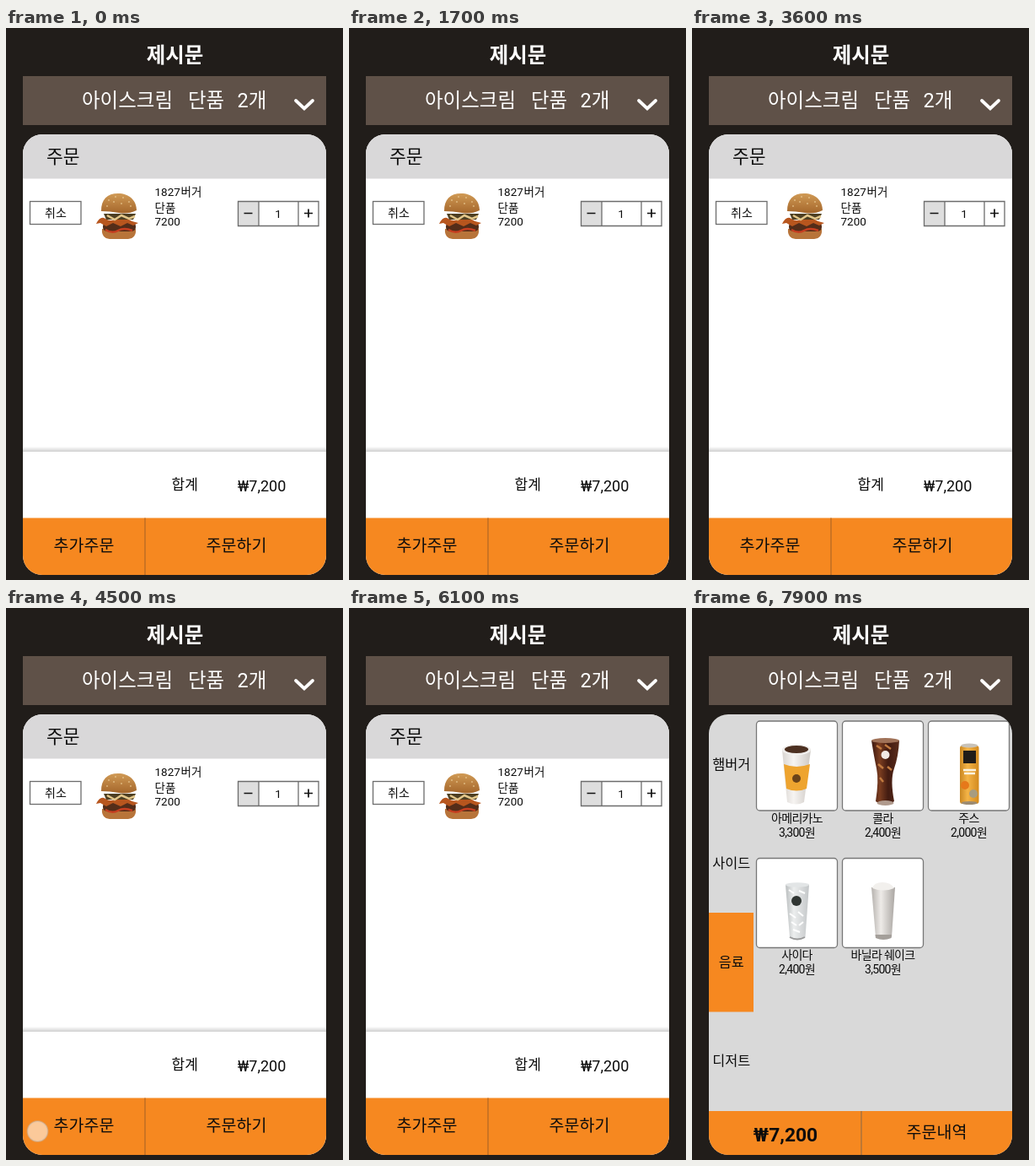
Animation, 400 px wide and 654 px high, one loop 8000 ms. Source, as an HTML page:

```html
<!DOCTYPE html>
<html lang="ko">
<head>
<meta charset="utf-8">
<style>
  html, body { margin: 0; width: 100%; height: 100%; overflow: hidden; background: #211d1a; }
  svg { display: block; width: 100vw; height: 100vh; }
  text { font-family: Roboto, "Noto Sans CJK KR", "Noto Sans CJK", sans-serif; fill: #0c0c0c; }
  .mid { text-anchor: middle; }
  .item { font-size: 14px; letter-spacing: -0.7px; text-anchor: middle; }
  .thin { fill: none; stroke: #6c6c6c; stroke-width: 1.3; }
</style>
</head>
<body>
<svg viewBox="0 0 400 654">
  <defs>
    <clipPath id="panel"><rect x="20" y="126" width="360" height="522" rx="23"/></clipPath>
    <linearGradient id="shade" x2="0" y2="1">
      <stop stop-color="#fff"/><stop offset="1" stop-color="#cfcfcf"/>
    </linearGradient>
    <linearGradient id="bun" x2="0" y2="1">
      <stop stop-color="#d09a55"/><stop offset="1" stop-color="#a4662b"/>
    </linearGradient>
    <linearGradient id="cup">
      <stop stop-color="#d9d5d1"/><stop offset=".4" stop-color="#f6f4f2"/><stop offset="1" stop-color="#cdc8c3"/>
    </linearGradient>
    <linearGradient id="cola">
      <stop stop-color="#3a1710"/><stop offset=".3" stop-color="#7b3d20"/><stop offset=".6" stop-color="#421b11"/><stop offset="1" stop-color="#5a2c1b"/>
    </linearGradient>
    <linearGradient id="can">
      <stop stop-color="#c98722"/><stop offset=".4" stop-color="#f4b447"/><stop offset="1" stop-color="#d38a1e"/>
    </linearGradient>
    <linearGradient id="ice">
      <stop stop-color="#b9bdbe"/><stop offset=".35" stop-color="#eceeee"/><stop offset="1" stop-color="#c3c6c8"/>
    </linearGradient>
    <linearGradient id="milk">
      <stop stop-color="#b5b1ad"/><stop offset=".4" stop-color="#eeebe8"/><stop offset="1" stop-color="#aaa6a2"/>
    </linearGradient>
  </defs>

  <rect width="400" height="654" fill="#211d1a"/>
  <text class="mid" x="200.5" y="40.5" font-size="24.5" font-weight="700" style="fill:#fff">제시문</text>
  <rect x="20" y="57" width="360" height="58" fill="#5f5148"/>
  <g font-size="23.5" style="--c:#fff">
    <text x="90" y="94" style="fill:#fff">아이스크림</text>
    <text x="216" y="94" style="fill:#fff">단품</text>
    <text x="274.5" y="94" style="fill:#fff">2개</text>
  </g>
  <path d="M344 86l10 9.5 10-9.5" fill="none" stroke="#fff" stroke-width="3.8" stroke-linecap="round"/>

  <g id="order" clip-path="url(#panel)">
    <rect x="20" y="126" width="360" height="522" fill="#fff"/>
    <rect x="20" y="126" width="360" height="52.5" fill="#d9d8d9"/>
    <text x="48" y="159.5" font-size="21.5">주문</text>
    <rect class="thin" x="28.5" y="205.5" width="60.5" height="27"/>
    <text class="mid" x="59" y="223.5" font-size="14">취소</text>

    <g id="burger">
      <path d="M114 238H154Q155 249 145 250H123Q113 249 114 238Z" fill="#b8743a"/>
      <rect x="115" y="230" width="39" height="11" rx="5" fill="#542d19"/>
      <path d="M118 239q8 5 15 1t17 0" stroke="#c63e20" stroke-width="2.5" fill="none"/>
      <path d="M107 232q5-10 11-6t13 0 13 0 13 5l-6 3-7-3-8 4-9-4-8 4-7-4Z" fill="#b8561e"/>
      <path d="M116 220H154L151 227H119Z" fill="#4e4023"/>
      <path d="M120 222l9 5 8-5 9 4 7-3" stroke="#e3c78a" stroke-width="2.5" fill="none"/>
      <path d="M113 217C113 203 120 196 133 196S155 204 155 216Q145 221 134 219T113 217Z" fill="url(#bun)"/>
      <path d="M121 204h2m6-4h2m7 1h2m5 5h2m-20 0h2m7 2h2m-19 3h2m26 0h2" stroke="#f0d29b" stroke-width="1.2"/>
    </g>

    <g font-size="13.5">
      <text x="176.5" y="199">1827</text>
      <text x="207.5" y="199">버거</text>
      <text x="176.5" y="218">단품</text>
      <text x="176.5" y="233.5">7200</text>
      <text class="mid" x="323" y="224.5">1</text>
    </g>
    <rect x="275.5" y="205.5" width="24.5" height="29" fill="#dedede"/>
    <path class="thin" d="M275.5 205.5H371V234.5H275.5ZM300 205.5V234.5M347 205.5V234.5"/>
    <path d="M282.5 219.5h10M354 219.5h10M359 214.5v10" stroke="#111" stroke-width="1.7"/>

    <rect x="20" y="496" width="360" height="6" fill="url(#shade)"/>
    <text x="196.5" y="547" font-size="17">합계</text>
    <text x="275" y="548.5" font-size="18">₩7,200</text>
    <rect x="20" y="580.5" width="360" height="68" fill="#f68820"/>
    <path d="M165 580.5V648" stroke="#b56a24" stroke-width="1.3"/>
    <g font-size="19.5" class="mid">
      <text x="92.5" y="620">추가주문</text>
      <text x="273.5" y="620">주문하기</text>
    </g>
  </g>

  <g id="menu" clip-path="url(#panel)">
    <rect x="20" y="126" width="360" height="522" fill="#d9d9d9"/>
    <rect x="20" y="361" width="53" height="117.5" fill="#f68820"/>
    <g id="tabs" font-size="16.3" class="mid"></g>
    <g id="items"></g>

    <g id="coffee">
      <path d="M107 168L113 230Q124 235 133 230L141 168Z" fill="url(#cup)"/>
      <ellipse cx="124" cy="168" rx="17" ry="6.5" fill="#f0eeec"/>
      <ellipse cx="124" cy="167.5" rx="14" ry="4.5" fill="#4c3021"/>
      <path d="M109 185Q124 191 140 185L136 214Q124 219 112 214Z" fill="#eea42f"/>
      <circle cx="124" cy="202" r="5" fill="#6b4319"/>
    </g>
    <g id="soda">
      <path d="M213 157H246Q245 176 240 190T240 229Q229 237 218 229Q222 204 219 190T213 157Z" fill="url(#cola)"/>
      <ellipse cx="229.5" cy="157" rx="16.5" ry="3" fill="#a07258"/>
      <path d="M219 163l6 4m4-5l7 5m-15 18l6 5m5-2l5 4m-14 9l4 5" stroke="#c17a40" stroke-width="2.5"/>
      <ellipse cx="229.5" cy="231" rx="10" ry="3" fill="#b09a8d"/>
      <circle cx="229.5" cy="174" r="5" fill="#f1e9e4"/>
    </g>
    <g id="juice">
      <rect x="318" y="163" width="22.5" height="69" rx="3" fill="url(#can)"/>
      <ellipse cx="329.2" cy="163" rx="10" ry="2.5" fill="#c8c2b8"/>
      <ellipse cx="329.2" cy="231" rx="9.5" ry="2" fill="#9b8a72"/>
      <rect x="322" y="169" width="15" height="15" fill="#211c18"/>
      <path d="M322 192h15m-14 4h13" stroke="#fbf3df" stroke-width="2.5"/>
      <circle cx="324" cy="210" r="5" fill="#e6791a"/><circle cx="334" cy="220" r="5" fill="#a79c80"/>
    </g>
    <g id="cider">
      <path d="M111 328H139L134.500 390Q125 395 116 390Z" fill="url(#ice)"/>
      <ellipse cx="125" cy="328" rx="14" ry="2.7" fill="#e2e5e6"/>
      <path d="M116 362l7 5m3-7l6 5m-14 7l6 4m3 0l5-4m-12 9l8 3m-13-50l6 4m6-3l7 3" stroke="#fff" stroke-width="2"/>
      <path d="M116 390Q125 395 134 390" stroke="#999" fill="none" stroke-width="2"/>
      <circle cx="124" cy="347" r="6" fill="#303633"/>
    </g>
    <g id="shake">
      <path d="M213 331H241L237 390Q227 395 218 390Z" fill="url(#milk)"/>
      <path d="M214 332Q216 325 226 325T240 332Q227 337 214 332Z" fill="#f2f0ed"/>
      <path d="M217.500 387H237L236.500 391Q227 395 218 391Z" fill="#a49f9a"/>
    </g>

    <rect x="20" y="596" width="360" height="52" fill="#f68820"/>
    <path d="M201 596V648" stroke="#a0703f" stroke-width="1.3"/>
    <text class="mid" x="111" y="631.5" font-size="22.8" font-weight="700">₩7,200</text>
    <text class="mid" x="290.5" y="628" font-size="19.5">주문내역</text>
  </g>

  <circle id="touch" r="12" fill="#fff" fill-opacity=".55" stroke="#bbb" stroke-opacity=".4" stroke-width="2"/>
</svg>
<script>
const LOOP = 8000, MENU_AT = 6400;
const taps = [
  { from: 800, to: 1200, x: 218.5, y: 87 },
  { from: 4300, to: 4700, x: 37.5, y: 620 }
];
const products = [["아메리카노", "3,300"], ["콜라", "2,400"], ["주스", "2,000"], ["사이다", "2,400"], ["바닐라 쉐이크", "3,500"]];
const $ = id => document.getElementById(id);

$("tabs").innerHTML = ["햄버거", "사이드", "음료", "디저트"]
  .map((name, i) => `<text x="46.700" y="${190.5 + i * 117.3}">${name}</text>`).join("");

$("items").innerHTML = products.map(([name, price], i) => {
  const x = 76.5 + (i % 3) * 102, y = 134 + Math.floor(i / 3) * 162.5;
  return `<rect x="${x}" y="${y}" width="96" height="106" rx="4" fill="#fff" stroke="#777" stroke-width="1.3"/>
    <text class="item" x="${x + 48}" y="${y + 119.5}">${name}</text>
    <text class="item" x="${x + 48}" y="${y + 136.5}">${price}원</text>`;
}).join("");

function render(time) {
  const inMenu = time >= MENU_AT;
  $("order").style.display = inMenu ? "none" : "";
  $("menu").style.display = inMenu ? "" : "none";
  const tap = taps.find(p => time >= p.from && time < p.to);
  $("touch").style.display = tap ? "" : "none";
  if (tap) $("touch").setAttribute("transform", `translate(${tap.x} ${tap.y})`);
}

const start = performance.now();
function tick() {
  render((performance.now() - start) % LOOP);
  requestAnimationFrame(tick);
}
tick();
</script>
</body>
</html>
```
